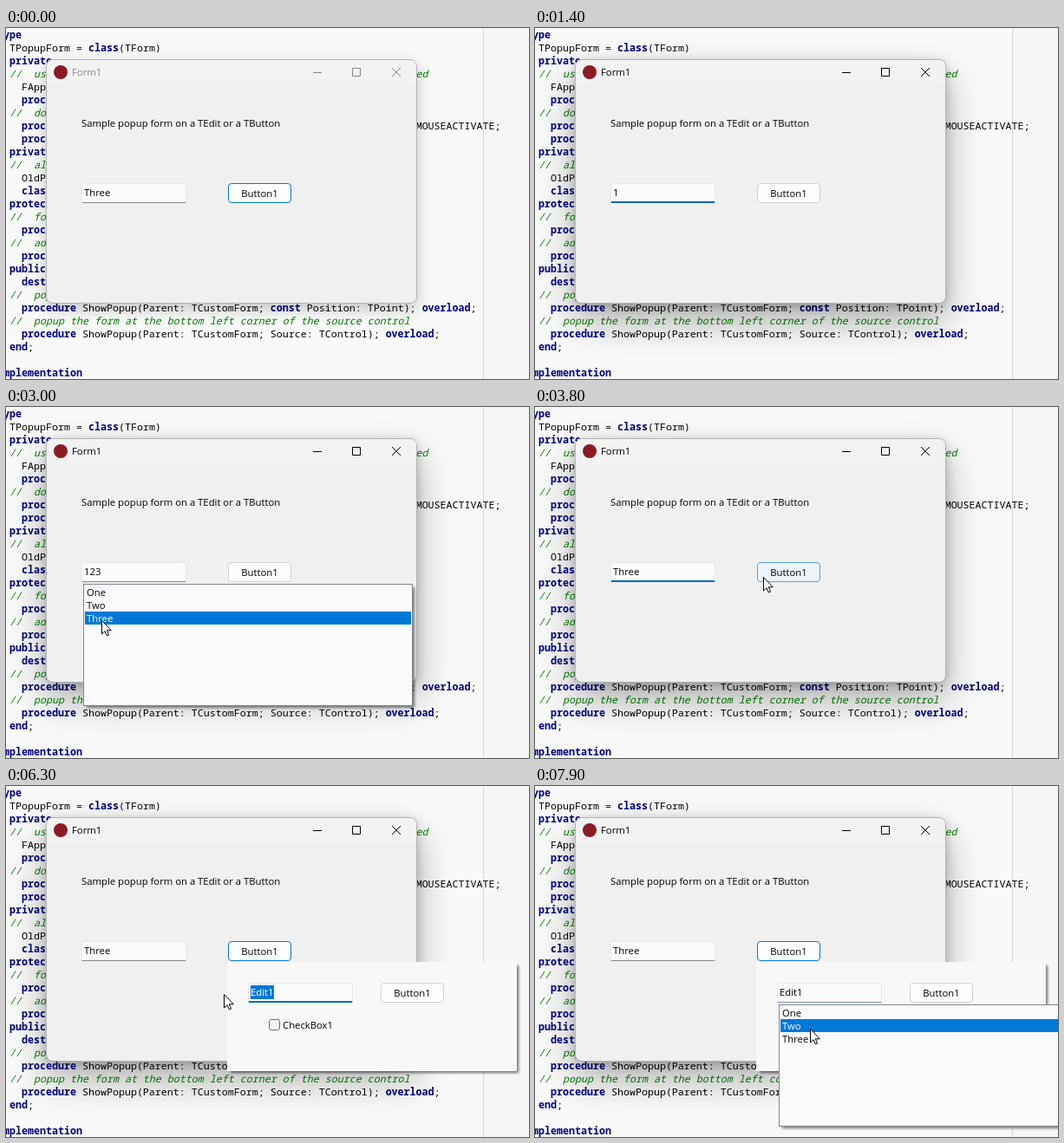
Animation of 603 by 405 pixels, one loop 8000 ms. Source, as an HTML page:

```html
<!DOCTYPE html>
<html lang="en">
<head>
<meta charset="utf-8">
<title>Popup form demo</title>
<style>
html, body { margin: 0; width: 100%; height: 100%; overflow: hidden; }
body { position: relative; background: #f9f9f9; color: #000; font: 11.3px/16px "Open Sans", "Noto Sans", sans-serif; }
div, svg, .abs { position: absolute; box-sizing: border-box; white-space: pre; }
svg { overflow: visible; }

/* code editor */
.margin { left: 550px; top: 0; width: 53px; height: 405px; background: #f6f6f6; border-left: 1px solid #d9d9d9; }
pre { position: absolute; margin: 0; left: -10px; top: 0; font: 11.667px/15px "Noto Sans Mono", "DejaVu Sans Mono", monospace; }
pre b { color: #000080; }
pre i { color: #008000; }
pre i::before { content: "//\20\20"; }

/* every timeline shares one clock with hard steps */
.t { animation-duration: 8s; animation-timing-function: step-end; animation-iteration-count: infinite; }

/* main window */
#win { left: 46px; top: 36px; width: 428px; height: 282px; border: 1px solid #b4b4b4; border-radius: 8px; background: #f0f0f0; animation-name: shadow; }
#bar { left: 47px; top: 37px; width: 426px; height: 29px; border-radius: 7px 7px 0 0; background: #f3f2f3; }
#caption { left: 0; top: 0; color: #000; animation-name: caption; }
#logo { left: 55px; top: 43px; width: 16px; height: 16px; border-radius: 50%; background: #8c1a24; }

/* controls */
.field { width: 121px; height: 23px; background: #fbfbfb; border: 1px solid #e9e9e9; border-bottom-color: #868686; border-radius: 3px 3px 1px 1px; }
.field > div { left: 2px; top: 2px; }
.field .sel { height: 16px; background: #0078d7; color: #fff; }
.button { width: 73px; height: 23px; line-height: 21px; text-align: center; background: #fdfdfd; border: 1px solid #d0d0d0; border-radius: 4px; }
.check { width: 13px; height: 13px; border: 1px solid #6b6b6b; border-radius: 3px; background: #f6f6f6; }
.list { width: 380px; height: 141px; border: 1px solid #828790; background: #f8fafc; box-shadow: 3px 3px 3px -1px rgba(0,0,0,.5); }
.list div { left: 1px; right: 1px; height: 15px; padding-left: 2px; line-height: 15px; }
.list div:nth-child(1) { top: 1px; }
.list div:nth-child(2) { top: 16px; }
.list div:nth-child(3) { top: 31px; }
#popup { left: 255px; top: 203px; width: 334px; height: 126px; background: #f8f8f8; box-shadow: 3px 3px 3px -1px rgba(0,0,0,.55); animation-name: popup; }

#edit { left: 87px; top: 179px; animation-name: edit; }
#three { animation-name: three; }
#threeSel { animation-name: threeSel; }
#d1 { animation-name: d1; }
#d2 { animation-name: d2; }
#d3 { animation-name: d3; }
#button { left: 256px; top: 179px; animation-name: button; }
#list1 { left: 89px; top: 204px; animation-name: list1; }
#pick1 { animation-name: pick1; }
#edit2 { left: 24px; top: 24px; animation-name: edit2; }
#edit2Sel { animation-name: edit2Sel; }
#list2 { left: 281px; top: 252px; animation-name: list2; }
#pick2 { animation-name: pick2; }

@keyframes shadow {
  0% { box-shadow: 0 6px 18px rgba(0,0,0,.22); }
  3.75%, 100% { box-shadow: 0 3px 12px rgba(0,0,0,.2), 0 20px 44px rgba(0,0,0,.3); }
}
@keyframes caption { 0% { color: #868686; } 3.75%, 100% { color: #000; } }
@keyframes edit {
  0%, 36.25%, 53.75%, 100% { border-bottom-color: #868686; box-shadow: none; }
  3.75%, 38.75% { border-bottom-color: #0067c0; box-shadow: inset 0 -1px #0067c0; }
}
@keyframes three { 0%, 38.75%, 100% { visibility: visible; } 17.5% { visibility: hidden; } }
@keyframes threeSel {
  0%, 17.5%, 100% { visibility: hidden; clip-path: none; }
  7.5% { visibility: visible; clip-path: inset(0 0 0 17px); }
  8.75% { visibility: visible; clip-path: none; }
}
@keyframes d1 { 0%, 38.75%, 100% { visibility: hidden; } 17.5% { visibility: visible; } }
@keyframes d2 { 0%, 38.75%, 100% { visibility: hidden; } 18.75% { visibility: visible; } }
@keyframes d3 { 0%, 38.75%, 100% { visibility: hidden; } 20% { visibility: visible; } }
@keyframes button {
  0%, 58.75%, 100% { background: #fdfdfd; border-color: #0078d4; }
  3.75% { background: #fdfdfd; border-color: #d0d0d0; }
  47.5% { background: #ebf4fb; border-color: #5a9fd6; }
  51.25% { background: #e0eef9; border-color: #0078d4; }
}
@keyframes list1 { 0%, 38.75%, 100% { visibility: hidden; } 21.25% { visibility: visible; } }
@keyframes pick1 { 0%, 38.75%, 100% { background: none; color: #000; } 36.25% { background: #0078d7; color: #fff; } }
@keyframes popup { 0% { opacity: 0; } 53.75%, 100% { opacity: 1; } }
@keyframes edit2 {
  0% { border-bottom-color: #868686; box-shadow: none; }
  61.25% { border-bottom-color: #0067c0; box-shadow: inset 0 -1px #0067c0; }
  93.75%, 100% { border-bottom-color: #7593b5; box-shadow: none; }
}
@keyframes edit2Sel {
  0%, 93.75%, 100% { visibility: hidden; clip-path: none; }
  62.5% { visibility: visible; clip-path: inset(0 0 0 18px); }
  63.75% { visibility: visible; clip-path: none; }
}
@keyframes list2 { 0% { visibility: hidden; } 80%, 100% { visibility: visible; } }
@keyframes pick2 { 0% { background: none; color: #000; } 93.75%, 100% { background: #0078d7; color: #fff; } }

/* mouse pointer */
#mouse { left: 0; top: 0; width: 0; height: 0; animation-name: move; }
#arrow { animation-name: arrow; }
#beam { animation-name: beam; }
@keyframes arrow {
  0%, 3.75%, 17.5%, 60% { visibility: hidden; }
  1.25%, 13.75%, 27.5%, 67.5%, 100% { visibility: visible; }
}
@keyframes beam {
  0%, 13.75%, 67.5%, 100% { visibility: hidden; }
  3.75%, 60% { visibility: visible; }
}
@keyframes move {
  0% { transform: translate(215px, 150px); }
  2.5% { transform: translate(190px, 182px); }
  3.75% { transform: translate(194px, 189px); }
  5% { transform: translate(170px, 189px); }
  6.25% { transform: translate(136px, 189px); }
  7.5% { transform: translate(104px, 189px); }
  8.75% { transform: translate(76px, 189px); }
  10% { transform: translate(59px, 189px); }
  11.25% { transform: translate(59px, 196px); }
  12.5% { transform: translate(59px, 198px); }
  13.75% { transform: translate(57px, 197px); }
  27.5% { transform: translate(65px, 205px); animation-timing-function: steps(7); }
  36.25% { transform: translate(110px, 246px); }
  40% { transform: translate(118px, 243px); }
  41.25% { transform: translate(125px, 240px); }
  45% { transform: translate(155px, 230px); }
  46.25% { transform: translate(212px, 212px); }
  47.5% { transform: translate(263px, 196px); }
  48.75% { transform: translate(277px, 193px); }
  50% { transform: translate(289px, 192px); }
  56.25% { transform: translate(291px, 196px); }
  57.5% { transform: translate(292px, 204px); }
  58.75% { transform: translate(303px, 220px); }
  60% { transform: translate(318px, 237px); }
  61.25% { transform: translate(317px, 239px); }
  62.5% { transform: translate(300px, 239px); }
  63.75% { transform: translate(276px, 240px); }
  65% { transform: translate(255px, 242px); }
  67.5% { transform: translate(251px, 242px); }
  73.75% { transform: translate(251px, 240px); }
  85% { transform: translate(262px, 246px); }
  86.25% { transform: translate(285px, 258px); }
  87.5% { transform: translate(310px, 268px); }
  88.75% { transform: translate(328px, 272px); }
  91.25% { transform: translate(325px, 273px); }
  93.75% { transform: translate(322px, 275px); animation-timing-function: steps(4); }
  98.75%, 100% { transform: translate(317px, 280px); }
}
</style>
</head>
<body>
<div class="margin"></div>
<pre><b>type</b>
  TPopupForm = <b>class</b>(TForm)
  <b>private</b>
  <i>use the Application OnDeactivate event to close the popup if used</i>
    FAppDeactivate: TNotifyEvent;
    <b>procedure</b> AppDeactivate(Sender: TObject);
  <i>do not activate the form on a click</i>
    <b>procedure</b> WMMouseActivate(<b>var</b> Msg: TWMMouseActivate); <b>message</b> WM_MOUSEACTIVATE;
    <b>procedure</b> DoPopup;
  <b>private</b>
  <i>allow one popup at a time</i>
    OldPopup: TPopupForm;
    <b>class var</b> Current: TPopupForm;
  <b>protected</b>
  <i>form style</i>
    <b>procedure</b> CreateParams(<b>var</b> Params: TCreateParams); <b>override</b>;
  <i>add a shadow</i>
    <b>procedure</b> CreateWnd; <b>override</b>;
  <b>public</b>
    <b>destructor</b> Destroy; <b>override</b>;
  <i>popup the form at a given position</i>
    <b>procedure</b> ShowPopup(Parent: TCustomForm; <b>const</b> Position: TPoint); <b>overload</b>;
  <i>popup the form at the bottom left corner of the source control</i>
    <b>procedure</b> ShowPopup(Parent: TCustomForm; Source: TControl); <b>overload</b>;
  <b>end</b>;

<b>implementation</b></pre>

<div id="win" class="t"></div>
<div id="bar"></div>
<div id="logo"></div>
<div id="caption" class="t">
<span class="abs" style="left:76px;top:43px">Form1</span>
<svg width="1" height="1" style="left:0;top:0" fill="none" stroke="currentColor">
  <path d="M354 51.5h10M399.5 46.5h9v9h-9zM445 46l10 10M455 46l-10 10"/>
</svg>
</div>
<div style="left:87px;top:102px">Sample popup form on a TEdit or a TButton</div>

<div id="edit" class="field t">
  <div id="three" class="t">Three</div>
  <div><span id="d1" class="t">1</span><span id="d2" class="t">2</span><span id="d3" class="t">3</span></div>
  <div id="threeSel" class="sel t">Three</div>
</div>
<div id="button" class="button t">Button1</div>

<div id="list1" class="list t"><div>One</div><div>Two</div><div id="pick1" class="t">Three</div></div>

<div id="popup" class="t">
  <div id="edit2" class="field t">
    <div>Edit1</div>
    <div id="edit2Sel" class="sel t">Edit1</div>
  </div>
  <div class="button" style="left:177px;top:24px">Button1</div>
  <div class="check" style="left:48px;top:66px"></div>
  <div style="left:64px;top:65px">CheckBox1</div>
</div>

<div id="list2" class="list t"><div>One</div><div id="pick2" class="t">Two</div><div>Three</div></div>

<div id="mouse" class="t">
  <svg width="1" height="1" style="left:0;top:0">
    <path id="arrow" class="t" d="M.5 .5V16L4 12.7 6.4 18 8.6 17 6.3 11.8H11.3Z" fill="#fff" stroke="#000"/>
    <path id="beam" class="t" d="M-3.5 -7.5h2.5l1.5 1 1.5 -1h2.5M-3.5 7.5h2.5l1.5 -1 1.5 1h2.5M.5 -6.5v13" fill="none" stroke="#000"/>
  </svg>
</div>
</body>
</html>
```
